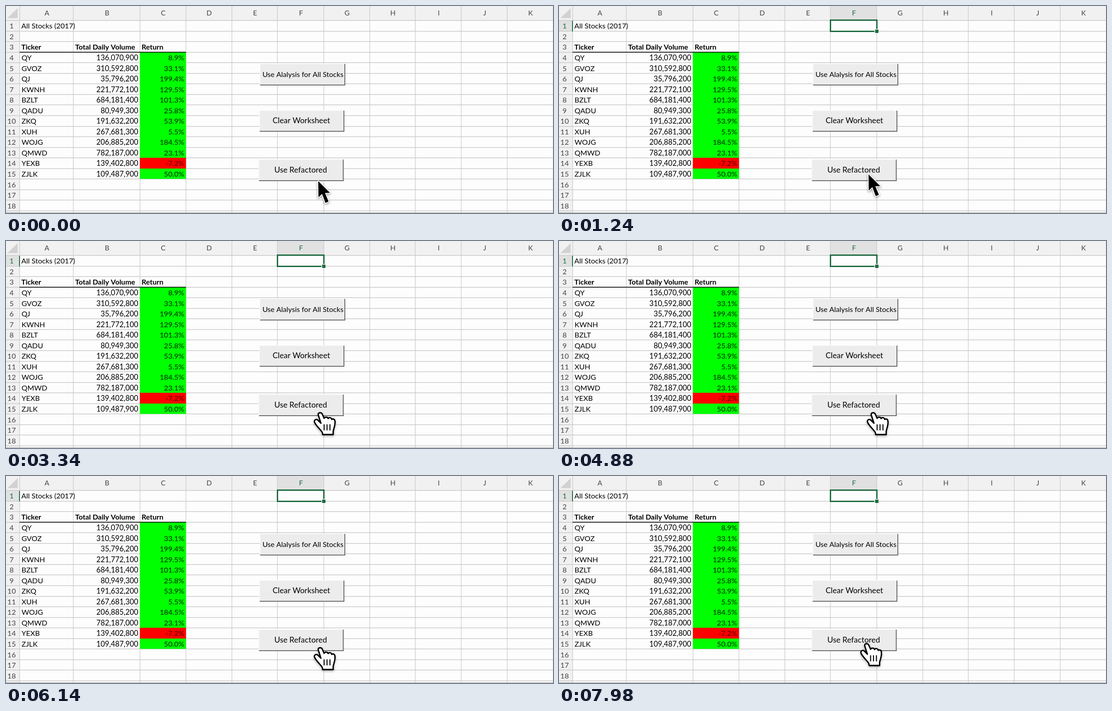
Animation of 1214 by 461 pixels, one loop 8 s. Source, as an HTML page with a canvas:

```html
<!DOCTYPE html>
<html lang="en">
<head>
<meta charset="utf-8">
<title>Stock worksheet</title>
<style>
html, body { margin: 0; width: 100%; height: 100%; overflow: hidden; background: #fdfdfd; }
canvas { display: block; }
</style>
</head>
<body>
<canvas id="stage" width="1214" height="461"></canvas>
<script>
const ctx = document.getElementById('stage').getContext('2d');
const LOOP = 8000, W = 1214, H = 461;
const TOP = 32, LEFT = 30, ROW_H = 23.55;
const FONT = 'Lato, Carlito, sans-serif';
const GREEN = '#1e6b41';
const cols = [30, 149.5, 297, 399, 501, 602.5, 705, 807, 908.5, 1010.5, 1112.5, 1214];
const stocks = [
  ['QY', '136,070,900', '8.9%'],
  ['GVOZ', '310,592,800', '33.1%'],
  ['QJ', '35,796,200', '199.4%'],
  ['KWNH', '221,772,100', '129.5%'],
  ['BZLT', '684,181,400', '101.3%'],
  ['QADU', '80,949,300', '25.8%'],
  ['ZKQ', '191,632,200', '53.9%'],
  ['XUH', '267,681,300', '5.5%'],
  ['WOJG', '206,885,200', '184.5%'],
  ['QMWD', '782,187,000', '23.1%'],
  ['YEXB', '139,402,800', '-7.2%'],
  ['ZJLK', '109,487,900', '50.0%']
];
const buttons = [
  [563, 128, 190, 49, 'Use Alalysis for All Stocks', 16, 659],
  [562, 232, 189, 48, 'Clear Worksheet', 17.3, 655.5],
  [560.5, 341, 189, 49, 'Use Refactored', 17.4, 654]
];

const rowTop = r => TOP + (r - 1) * ROW_H;
const rowMid = r => rowTop(r) + 12.8;

function rect(x, y, w, h, color) {
  ctx.fillStyle = color;
  ctx.fillRect(x, y, w, h);
}

function text(str, x, mid, { align = 'left', size = 16.2, weight = 400, color = '#000' } = {}) {
  ctx.font = `${weight} ${size}px ${FONT}`;
  ctx.textAlign = align;
  ctx.fillStyle = color;
  ctx.fillText(str, x, mid + 5.5);
}

function drawHeaders(selected) {
  rect(0, 0, W, TOP, '#f1f1f1');
  rect(0, 0, LEFT, H, '#f1f1f1');
  if (selected) {
    rect(602.5, 0, 102.5, TOP, '#e1e1e1');
    rect(0, TOP, LEFT, ROW_H, '#e1e1e1');
  }
  ctx.fillStyle = '#d2d2d2';
  ctx.fill(new Path2D('M26 5V27H3Z'));
  for (let i = 0; i < 11; i++) {
    const active = selected && i === 5;
    text('ABCDEFGHIJK'[i], (cols[i] + cols[i + 1]) / 2 + 1, 15,
      { align: 'center', size: 15.5, color: active ? GREEN : '#444' });
  }
  for (let r = 1; r <= 18; r++) {
    text(r, 12.5, rowMid(r),
      { align: 'center', color: selected && r === 1 ? GREEN : '#444' });
  }
}

function drawGrid() {
  for (const x of cols) rect(Math.floor(x) - 0.25, 0, 1.3, H, '#cbcbcb');
  for (let r = 1; r <= 19; r++) rect(0, Math.round(rowTop(r)) - 0.5, W, 1.5, '#c9c9c9');
  rect(0, 460, W, 1, '#93958d');
}

function drawTable() {
  text('All Stocks (2017)', 34, rowMid(1));
  const bold = { weight: 700, size: 16 };
  text('Ticker', 34, rowMid(3), bold);
  text('Total Daily Volume', 153.5, rowMid(3), bold);
  text('Return', 301, rowMid(3), bold);
  stocks.forEach(([ticker, volume, gain], i) => {
    const r = i + 4, y = Math.round(rowTop(r)), loss = gain[0] === '-';
    rect(297, y, 102.5, Math.round(rowTop(r + 1)) - y, loss ? '#f00' : '#0f0');
    text(ticker, 34.5, rowMid(r));
    text(volume, 293.5, rowMid(r), { align: 'right', size: 16.4 });
    text(gain, 395.5, rowMid(r), { align: 'right', color: loss ? '#4a0000' : '#002000' });
  });
  rect(LEFT, 102, 369.5, 1.6, '#000');
}

function drawButton([x, y, w, h, label, size, cx]) {
  rect(x, y, w, h, '#ececec');
  rect(x, y, w, 1.5, '#fafafa');
  rect(x, y, 1.5, h, '#fafafa');
  rect(x + 1, y + h - 2, w - 1, 2, '#6c6c6c');
  rect(x + w - 2, y + 1, 2, h - 1, '#6c6c6c');
  text(label, cx, y + h / 2 - 0.5, { align: 'center', size });
}

function drawSelection() {
  rect(29, TOP + 1, 2, ROW_H, GREEN);
  ctx.strokeStyle = GREEN;
  ctx.lineWidth = 3;
  ctx.strokeRect(602.5, 31.5, 103, 25);
  rect(700, 51, 9, 9, '#fff');
  rect(701.5, 52.5, 7.5, 7.5, GREEN);
}

const arrow = new Path2D('M1 2L1.5 38L9.5 30.5L17 50.5L24 47.5L16 28.5L27 28Z');
const hand = new Path2D('M-4 5C-5 0 3 -1 5 4L9 13C11 9 17 10 18 13.5C20 10 25 11 26 15.5' +
  'C29 13 33 15 33 20C34 28 30 36 29 42V49H6L5 44C0 37 -8 30 -12 22' +
  'C-14 16 -8 14 -5 17L2 24Z');
const creases = new Path2D('M9 27V39M15.5 27V39M22 27V39');

function drawCursor({ x, y, isHand }) {
  const shape = isHand ? hand : arrow;
  ctx.save();
  ctx.translate(x, y);
  ctx.lineJoin = ctx.lineCap = 'round';
  ctx.shadowColor = 'rgba(0,0,0,.45)';
  ctx.shadowBlur = 5;
  ctx.shadowOffsetY = 2;
  ctx.lineWidth = isHand ? 2.8 : 3.4;
  ctx.strokeStyle = isHand ? '#000' : '#fff';
  ctx.stroke(shape);
  ctx.shadowColor = 'transparent';
  ctx.fillStyle = isHand ? '#fff' : '#000';
  ctx.fill(shape);
  if (isHand) {
    ctx.stroke(shape);
    ctx.lineWidth = 2.2;
    ctx.stroke(creases);
  }
  ctx.restore();
}

// time, x, y of the pointer's hot spot
const path = [
  [0, 692, 388], [840, 692, 388], [1200, 686, 373], [2080, 686, 373],
  [2360, 697, 382], [6720, 697, 382], [6960, 682.5, 370],
  [7680, 682.5, 370], [7960, 682.5, 373], [LOOP, 682.5, 373]
];

function cursorAt(t) {
  const i = path.findIndex(p => p[0] > t);
  const [t0, x0, y0] = path[i - 1], [t1, x1, y1] = path[i];
  const u = (t - t0) / (t1 - t0), k = u * u * (3 - 2 * u);
  return { x: x0 + (x1 - x0) * k, y: y0 + (y1 - y0) * k, isHand: t >= 2200 };
}

function draw(now) {
  const t = now % LOOP, selected = t >= 1000;
  rect(0, 0, W, H, '#fdfdfd');
  drawHeaders(selected);
  drawGrid();
  drawTable();
  buttons.forEach(drawButton);
  if (selected) drawSelection();
  drawCursor(cursorAt(t));
}

const start = performance.now();
function tick() {
  draw(performance.now() - start);
  requestAnimationFrame(tick);
}
tick();
</script>
</body>
</html>
```
